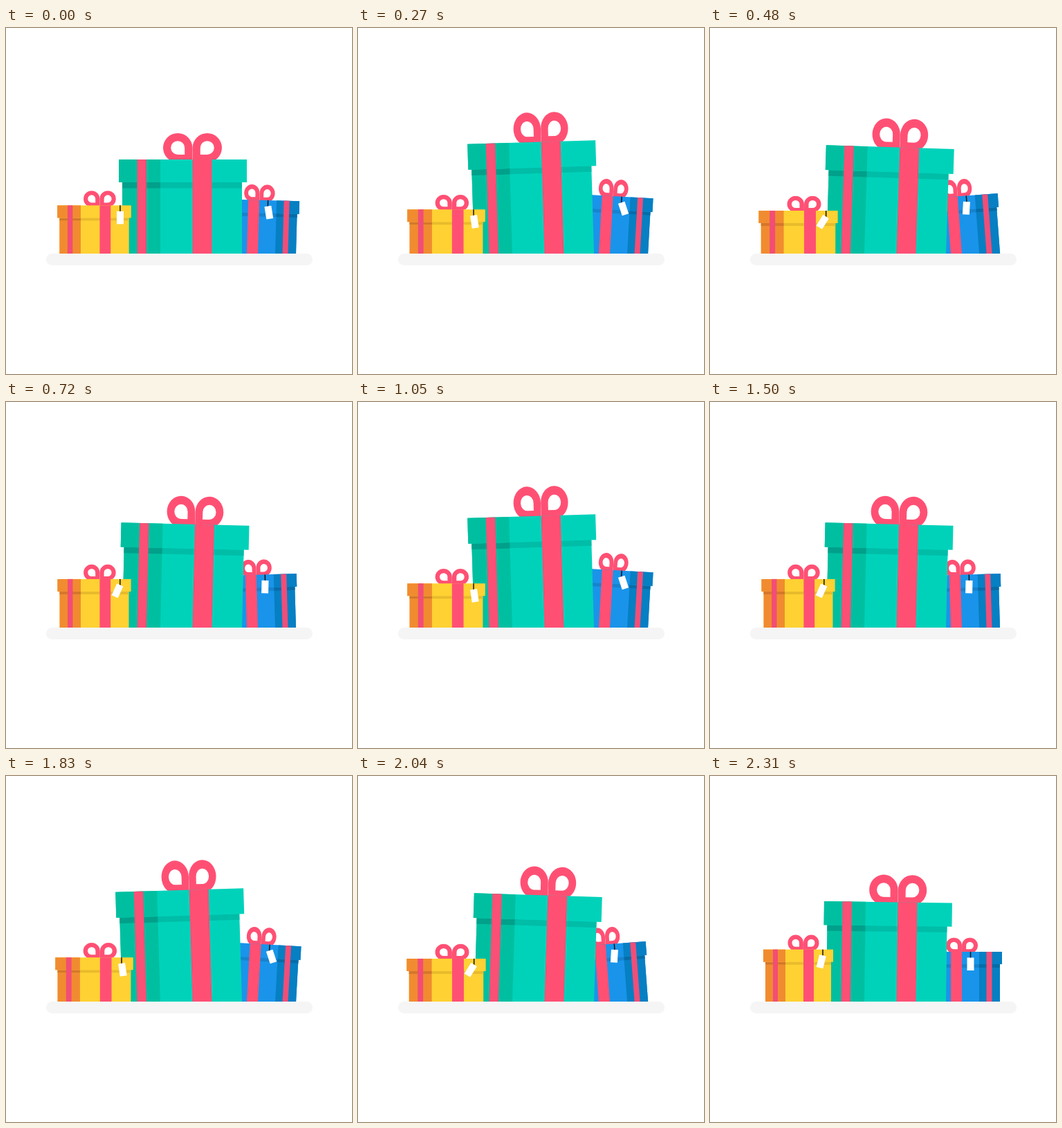
Recreate the animation shown at these times as an HTML page. Size 500 px wide and 500 px high, loop 2340 ms.

```html
<!DOCTYPE html>
<html lang="en">
<head>
<meta charset="utf-8">
<title>Dancing gift boxes</title>
<style>
  html, body { margin: 0; width: 100%; height: 100%; overflow: hidden; background: #fff; }
  svg { display: block; width: 100%; height: 100%; }
</style>
</head>
<body>
<svg viewBox="0 0 500 500">
  <defs><clipPath id="floor"><rect width="500" height="326"/></clipPath></defs>
  <rect x="58" y="326" width="385" height="17" rx="8.5" fill="#f5f5f5"/>
  <g id="scene" clip-path="url(#floor)"></g>
</svg>
<script>
const BEAT = 390, STEP = 30, FLOOR = 326, PINK = '#ff5074';
const scene = document.getElementById('scene');

// Each pair holds the amounts for the first and the second beat.
// Horizontal places are stage coordinates at rest.
const blue = {
  pivot: 371.5, lead: 30, height: 72, grow: [13, 12], widen: 0, tilt: [3.9, -4.5],
  lid: [321, 422], body: [324, 419], side: [389, 422], stripe: [399.5, 407.5], ribbon: [348, 364],
  lidH: 18, lidGrow: 0.16, shade: 5,
  bow: 364, bowW: 46, bowH: 20.2, bowGrow: 0.4, bowWiden: -0.3,
  light: '#1994ea', dark: '#067fc3', lightShade: '#1583cf', darkShade: '#056ca8', stripeFill: '#f04e78',
  tag: { x: 376.5, lead: 30, swing: [-26, 8] }
};
const green = {
  pivot: 255.5, lead: 0, height: 136, grow: [27, 21], widen: 0, tilt: [-1.85, 2.1],
  lid: [163, 348], body: [168, 341], side: [163, 223], stripe: [189.5, 203], ribbon: [269.5, 297.5],
  lidH: 33, lidGrow: 0.16, shade: 8.5,
  bow: 269.5, bowW: 85, bowH: 38, bowGrow: 0.19, bowWiden: -0.24,
  light: '#00d2ba', dark: '#00bfa0', lightShade: '#00bda7', darkShade: '#00a08a', stripeFill: '#fa5076'
};
const yellow = {
  pivot: 127.5, lead: 30, height: 75.3, grow: [-14, -14], widen: 14, tilt: [0, 0],
  lid: [77, 178], body: [80, 175], side: [77, 109], stripe: [91, 98], ribbon: [135, 150],
  lidH: 18, lidGrow: 0, shade: 4,
  bow: 135, bowW: 45, bowH: 21.2, bowGrow: 0, bowWiden: -0.3,
  light: '#ffd133', dark: '#f18b30', lightShade: '#e8bb2c', darkShade: '#d5762a', stripeFill: '#f34d76',
  tag: { x: 163, lead: 0, swing: [-9, 38] }
};

// Quick away from the squash, slow around the top of each beat.
function pulse(time) {
  const t = time % (2 * BEAT);
  const d = (t % BEAT) / BEAT * 2 - 1;
  return { beat: t < BEAT ? 0 : 1, f: 1 - Math.pow(Math.abs(d), d < 0 ? 3.1 : 2.8) };
}

const rect = (a, b, y, h, fill) =>
  `<rect x="${a}" y="${y}" width="${b - a}" height="${h}" fill="${fill}"/>`;

// A circle with one square corner, bottom and towards the knot.
function drop(side, r) {
  const x = 21.3 * side, y = -17, e = x - side * r;
  return `M${e} ${y}V${y + r}H${x}A${r} ${r} 0 1 ${side < 0 ? 1 : 0} ${e} ${y}Z`;
}
const bowPath = [-1, 1].map(s =>
  `<path fill-rule="evenodd" d="${drop(s, 21.2)}${drop(s, 10)}"/>`).join('');

function tagMarkup(tag, x, top, time) {
  const p = pulse(time + tag.lead), angle = tag.swing[p.beat] * p.f;
  return `<path d="M${x} ${top}v9" stroke="#111" stroke-width="1.5"/>` +
    `<rect x="-5" width="10" height="18.5" fill="#fff" transform="translate(${x} ${top + 8.5}) rotate(${angle})"/>`;
}

function boxMarkup(b, time) {
  const { beat, f } = pulse(time + b.lead);
  const rise = b.grow[beat] * f;
  const top = -b.height - rise;
  const sx = 1 + b.widen * f / (b.lid[1] - b.lid[0]);
  const at = x => (x - b.pivot) * sx;
  const band = ([l, r], y, h, fill) => rect(at(l), at(r), y, h, fill);
  const clip = ([l, r]) => [Math.max(l, b.body[0]), Math.min(r, b.body[1])];
  const lidH = b.lidH + rise * b.lidGrow, edge = top + lidH, side = clip(b.side);
  const kx = (b.bowW + rise * b.bowWiden) / 85, ky = (b.bowH + rise * b.bowGrow) / 38.2;

  return `<g transform="translate(${b.pivot} ${FLOOR}) rotate(${b.tilt[beat] * f})">` +
    `<g fill="${PINK}" transform="translate(${at(b.bow)} ${top}) scale(${kx} ${ky})">${bowPath}</g>` +
    band(b.body, edge - 1, 12 - edge, b.light) +
    band(side, edge - 1, 12 - edge, b.dark) +
    band(b.body, edge, b.shade, b.lightShade) +
    band(side, edge, b.shade, b.darkShade) +
    band(b.lid, top, lidH, b.light) +
    band(b.side, top, lidH, b.dark) +
    band(b.stripe, top, 12 - top, b.stripeFill) +
    band(b.ribbon, top, 12 - top, PINK) +
    (b.tag ? tagMarkup(b.tag, at(b.tag.x), top, time) : '') + '</g>';
}

function draw(time) {
  scene.innerHTML = [blue, green, yellow].map(b => boxMarkup(b, time)).join('');
}

const start = performance.now();
function tick() {
  const t = performance.now() - start;
  draw(Math.floor((t + 1) / STEP) * STEP);
  requestAnimationFrame(tick);
}
tick();
</script>
</body>
</html>
```
